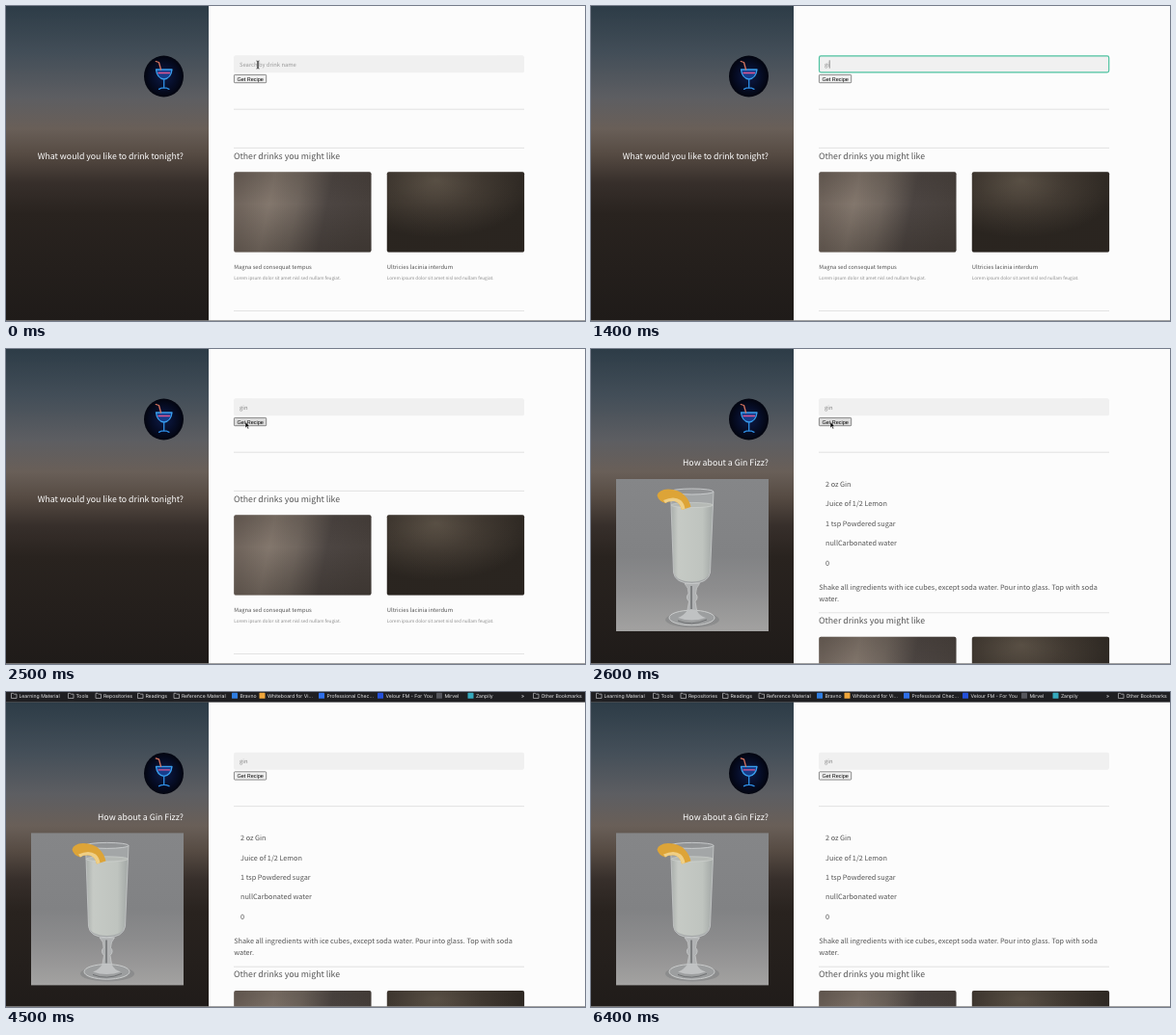
An HTML page that plays this animation: 600 px wide and 327 px high, repeating every 6500 ms.

```html
<!DOCTYPE html>
<html lang="en">
<head>
<meta charset="utf-8">
<title>Drink finder</title>
<style>
html, body { margin: 0; width: 100%; height: 100%; overflow: hidden; background: #fcfcfc; }
svg { display: block; width: 100vw; height: 100vh; }
text { font-family: "Noto Sans CJK JP", "Noto Sans CJK SC", "Noto Sans CJK", "Noto Sans", sans-serif; font-size: 7.28px; fill: #555; text-rendering: geometricPrecision; white-space: pre; }
.head { font-size: 8.74px; }
.side { fill: #fff; text-anchor: end; }
.sub { font-size: 5.83px; }
.tiny { font-size: 4.66px; fill: #8e8e8e; }
#btnText { font: 5.5px "Liberation Sans", Arial, sans-serif; fill: #000; }
#bar text { font: 5.15px Inter, Roboto, sans-serif; fill: #e9e9ea; }
.rule { stroke: #e0e0e0; stroke-width: .9; }
</style>
</head>
<body>
<svg viewBox="0 0 600 327" preserveAspectRatio="none">
  <defs>
    <linearGradient id="dusk" x1="0" y1="0" x2="0" y2="327" gradientUnits="userSpaceOnUse">
      <stop offset="0" stop-color="#2d3c47"/>
      <stop offset=".15" stop-color="#434e58"/>
      <stop offset=".29" stop-color="#5d5e62"/>
      <stop offset=".39" stop-color="#695f58"/>
      <stop offset=".47" stop-color="#564b43"/>
      <stop offset=".56" stop-color="#372f2b"/>
      <stop offset=".66" stop-color="#29231f"/>
      <stop offset="1" stop-color="#1f1b19"/>
    </linearGradient>
    <linearGradient id="thumbA" x1="0" y1="0" x2="1" y2=".12">
      <stop offset="0" stop-color="#6a5f57"/>
      <stop offset=".3" stop-color="#83776d"/>
      <stop offset=".5" stop-color="#71675f"/>
      <stop offset=".72" stop-color="#4c4542"/>
      <stop offset="1" stop-color="#47403c"/>
    </linearGradient>
    <linearGradient id="shade" x1="0" y1="0" x2="0" y2="1">
      <stop offset="0" stop-color="#2a241f" stop-opacity=".2"/>
      <stop offset=".4" stop-color="#2a241f" stop-opacity="0"/>
      <stop offset="1" stop-color="#2a241f" stop-opacity=".35"/>
    </linearGradient>
    <radialGradient id="thumbB" cx=".36" cy=".1" r=".72">
      <stop offset="0" stop-color="#61574b"/>
      <stop offset=".45" stop-color="#443c34"/>
      <stop offset="1" stop-color="#2a2520"/>
    </radialGradient>
    <linearGradient id="wall" x1="0" y1="0" x2="0" y2="1">
      <stop offset="0" stop-color="#858688"/>
      <stop offset=".5" stop-color="#818284"/>
      <stop offset=".72" stop-color="#8d8d8e"/>
      <stop offset="1" stop-color="#a3a2a1"/>
    </linearGradient>
    <linearGradient id="fizz" x1="0" y1="0" x2="1" y2="0">
      <stop offset="0" stop-color="#a9aeab"/>
      <stop offset=".16" stop-color="#c6cac5"/>
      <stop offset=".75" stop-color="#bfc4bf"/>
      <stop offset="1" stop-color="#a3a8a6"/>
    </linearGradient>
    <radialGradient id="night">
      <stop offset="0" stop-color="#0d1c4a"/>
      <stop offset=".6" stop-color="#060d27"/>
      <stop offset="1" stop-color="#03050f"/>
    </radialGradient>
  </defs>

  <rect width="600" height="327" fill="#fcfcfc"/>
  <g id="page">
    <rect y="-1" width="210" height="330" fill="url(#dusk)"/>

    <ellipse cx="163.5" cy="73" rx="20.5" ry="21.5" fill="url(#night)"/>
    <g fill="none" stroke-linecap="round" stroke-linejoin="round" stroke-width="1.3">
      <path d="M155.5 66H172Q171 75 163.7 76Q156.500 75 155.500 66Z" fill="#173d8c" stroke="#3aa0ee"/>
      <path d="M163.700 76V85M158.500 86.300Q163.700 83.600 169 86.300" stroke="#2f8fe6"/>
      <path d="M158 69.500H169.500" stroke="#e0568f"/>
      <path d="M160.500 66L158.500 58.500L155.300 57.500" stroke="#d9765f"/>
    </g>

    <text id="title" class="head side" x="184" y="158.700"></text>
    <g id="drink">
      <rect x="26" y="135" width="158" height="158" fill="url(#wall)"/>
      <ellipse cx="105" cy="281" rx="28" ry="8" fill="#77787a" opacity=".45"/>
      <path d="M82.500 148L85.500 232Q87 243 104.500 243.500Q121.500 243 123.500 232L127 148Z" fill="#a3a6a7"/>
      <path d="M83.200 162L85.800 231Q87 241 104.500 241.500Q121.500 241 123 231L126.300 162Z" fill="url(#fizz)"/>
      <ellipse cx="104.700" cy="162" rx="21.500" ry="2.600" fill="#b5b9b5" stroke="#d2d5d2" stroke-width=".6"/>
      <ellipse cx="104.700" cy="148" rx="22.200" ry="3" fill="#929496" stroke="#d5d7d8" stroke-width=".8"/>
      <path d="M82.500 148L85.500 232Q87 243 104.500 243.500Q121.500 243 123.500 232L127 148" fill="none" stroke="#c9cccc" stroke-width=".8"/>
      <path d="M97 243.500Q101.500 248 101 254Q97.500 258 101.500 262L100 271Q98 274 88 276H121Q111.500 274 109.500 271L108 262Q112 258 108.500 254Q108.500 248 112.500 243.500Z" fill="#b0b2b3" stroke="#d3d5d5" stroke-width=".6"/>
      <path d="M104 246V270" stroke="#77797b" stroke-width="1.800"/>
      <ellipse cx="104.500" cy="279" rx="23.500" ry="7.800" fill="#9c9e9f" stroke="#d0d2d2" stroke-width=".9"/>
      <path d="M100 271Q96 277 90 279Q104 284 119 279Q112 277 109.500 271Z" fill="#c0c2c3"/>
      <path d="M90 282Q104 288 120 281" fill="none" stroke="#6f7173" stroke-width="1"/>
      <path d="M68.500 152Q70 146 80 145.500Q91 145.500 97 152Q102 157 103.500 164L94 167Q92 159 86.500 158Q80 157.500 77 160Q70 158 68.500 152Z" fill="#dda437"/>
      <path d="M75 157Q86 152 93 157Q96.500 160 97.500 166L94 167Q92 159 86.500 158Q80 157.500 77 160Z" fill="#efcf86"/>
    </g>

    <rect x="236" y="51.300" width="301" height="18" rx="2" fill="#f0f0f0"/>
    <rect id="ring" x="236.500" y="51.900" width="300.200" height="17" rx="1.800" fill="none" stroke="#4fc3a1" stroke-width="1.200"/>
    <text id="query" class="sub" x="242" y="62.600"></text>
    <rect id="caret" y="56.300" width=".7" height="8.400" fill="#666"/>
    <rect id="btn" x="236.400" y="71.400" width="33.300" height="8.300" rx=".8" stroke="#5c5c5c" stroke-width=".7"/>
    <text id="btnText" x="239.400" y="77.500">Get Recipe</text>
    <path class="rule" d="M236 107.200H537"/>

    <g id="recipe"></g>

    <g id="more">
      <path class="rule" d="M236 147.400H537M236 316.500H537"/>
      <text class="head" x="236" y="158.700">Other drinks you might like</text>
      <g id="cards"></g>
    </g>
  </g>

  <rect y="326" x="0" width="600" height="1" fill="#8a8a8a" opacity=".8"/>
  <g id="bar"><rect y="-1" width="600" height="11.600" fill="#1f1f22"/></g>
  <path id="beam" d="M-1.500 -4Q0 -4 0 -3V3Q0 4 -1.500 4M1.500 -4Q0 -4 0 -3V3Q0 4 1.500 4" fill="none" stroke="#222" stroke-width=".8"/>
  <path id="arrow" d="M0 0V6.400L1.500 5.100L2.500 7.400L3.600 6.900L2.600 4.700H4.600Z" fill="#000" stroke="#fff" stroke-width=".5"/>
</svg>
<script>
const LOOP = 6500, STEP = 100;
const FOCUS = 200, CLICK = 2300, SERVED = 2600;
const BAR_HEIGHT = 11.4;
const keys = [[900, 'g'], [1200, 'gi'], [1500, 'gin']];
// Pointer stops: time, x, y
const pointer = [[0, 261, 61], [1700, 261, 61], [2200, 248, 75.5], [4000, 248, 75.5], [4300, 256, -10]];

const $ = id => document.getElementById(id);
const show = (id, on) => $(id).setAttribute('visibility', on ? 'visible' : 'hidden');
const move = (id, x, y) => $(id).setAttribute('transform', `translate(${x} ${y})`);
const ease = p => p * p * (3 - 2 * p);
const ramp = (t, a, b) => ease(Math.min(1, Math.max(0, (t - a) / (b - a))));

function add(parent, tag, attrs, content = '') {
  const el = document.createElementNS('http://www.w3.org/2000/svg', tag);
  for (const k in attrs) el.setAttribute(k, attrs[k]);
  el.textContent = content;
  $(parent).append(el);
}

function addCard(x, fill, name) {
  const box = { x, y: 172.3, width: 142.3, height: 83.2, rx: 2 };
  add('cards', 'rect', { ...box, fill });
  add('cards', 'rect', { ...box, fill: 'url(#shade)' });
  add('cards', 'text', { x, y: 272.5, class: 'sub' }, name);
  add('cards', 'text', { x, y: 284, class: 'tiny' }, 'Lorem ipsum dolor sit amet nisl sed nullam feugiat.');
}
addCard(236.2, 'url(#thumbA)', 'Magna sed consequat tempus');
addCard(394.8, 'url(#thumbB)', 'Ultricies lacinia interdum');

['2 oz Gin', 'Juice of 1/2 Lemon', '1 tsp Powdered sugar', 'nullCarbonated water', '0']
  .forEach((s, i) => add('recipe', 'text', { x: 243, y: 142.9 + i * 20.4 }, s));
['Shake all ingredients with ice cubes, except soda water. Pour into glass. Top with soda', 'water.']
  .forEach((s, i) => add('recipe', 'text', { x: 236.2, y: 249.6 + i * 12.3 }, s));

// Bookmarks: icon x, label, icon colour (none means a folder)
[
  [5, 'Learning Material'], [64, 'Tools'], [92.5, 'Repositories'], [136, 'Readings'],
  [173.5, 'Reference Material'], [234, 'Bravno', '#2f7de0'], [262.5, 'Whiteboard for Vi...', '#f0a63a'],
  [324, 'Professional Chec...', '#2f6fe8'], [385, 'Velour FM - For You', '#2450d8'],
  [446, 'Mirvel', '#55565c'], [478.500, 'Zanpily', '#35a9bd'], [546, 'Other Bookmarks']
].forEach(([x, label, fill]) => {
  if (fill) add('bar', 'rect', { x, y: 0.8, width: 6, height: 6, rx: 0.6, fill });
  else add('bar', 'path', { d: `M${x + 0.5} 1.300h2l.8 .9h2.700v4.300h-5.500z`, fill: 'none', stroke: '#bdbdc0', 'stroke-width': 0.7 });
  add('bar', 'text', { x: x + 8.4, y: 5.5 }, label);
});
add('bar', 'text', { x: 534, y: 5.5 }, '»');

function pointerAt(t) {
  const i = pointer.findIndex(p => p[0] > t);
  if (i < 0) return pointer[pointer.length - 1].slice(1);
  const [t0, x0, y0] = pointer[i - 1], [t1, x1, y1] = pointer[i];
  const p = ramp(t, t0, t1);
  return [x0 + (x1 - x0) * p, y0 + (y1 - y0) * p];
}

function draw(t) {
  const typed = keys.reduce((s, [at, word]) => t >= at ? word : s, '');
  const focused = t >= FOCUS && t < CLICK;
  const served = t >= SERVED;

  const query = $('query');
  query.textContent = typed || 'Search by drink name';
  query.style.fill = typed ? '#808080' : '#999';
  show('ring', focused);

  // The caret blink restarts at every key press
  const since = keys.reduce((s, [at]) => t >= at ? at : s, FOCUS);
  show('caret', focused && Math.floor((t - since) / 500) % 2 === 0);
  $('caret').setAttribute('x', 241.9 + (typed ? query.getComputedTextLength() : 0));

  $('title').textContent = served ? 'How about a Gin Fizz?' : 'What would you like to drink tonight?';
  $('title').setAttribute('y', served ? 121.3 : 158.7);
  show('drink', served);
  show('recipe', served);
  move('more', 0, served ? 126.4 : 0);

  const [x, y] = pointerAt(t);
  const over = (x0, y0, x1, y1) => x >= x0 && x <= x1 && y >= y0 && y <= y1;
  const inField = over(236, 51, 537, 69.5) && t < CLICK;
  const typing = t >= keys[0][0] && t < 1800;
  show('beam', inField && !typing);
  show('arrow', !inField && !typing && y > -8);
  move('beam', x, y);
  move('arrow', x, y);
  $('btn').setAttribute('fill', over(236, 71, 270, 80) ? '#dcdcdc' : '#efefef');

  const slide = ramp(t, 4200, 4500) * BAR_HEIGHT;
  move('page', 0, slide);
  move('bar', 0, slide - BAR_HEIGHT);
}

const start = performance.now();
function tick() {
  const t = (performance.now() - start) % LOOP;
  draw(Math.floor(t / STEP) * STEP);
  requestAnimationFrame(tick);
}
tick();
</script>
</body>
</html>
```
